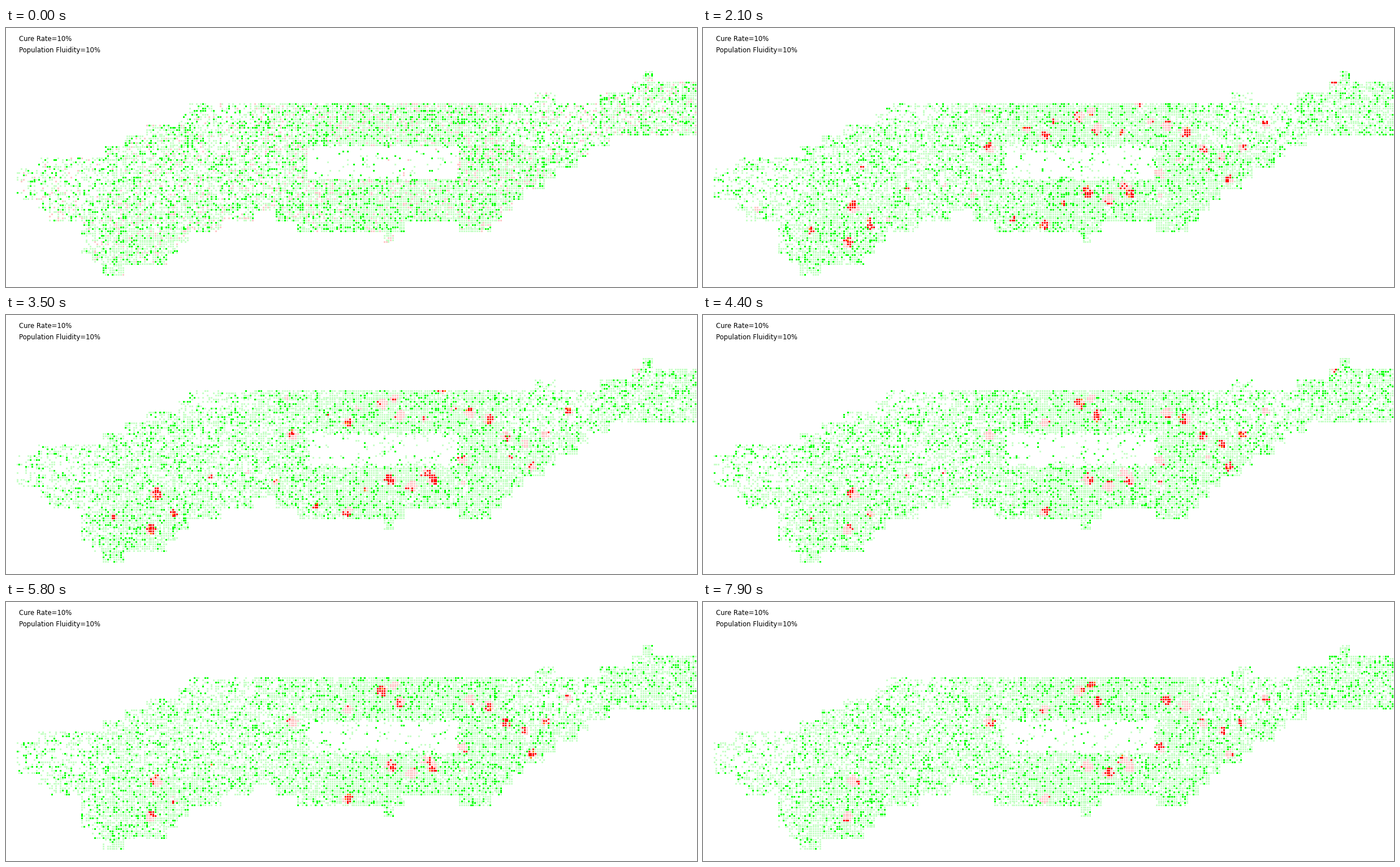
A matplotlib script for the animation above (8 s loop, 1222x458 px).

```python
import numpy as np
import matplotlib.pyplot as plt
from matplotlib.animation import FuncAnimation

W, H = 1222, 458
COLS, ROWS, BLOCK = 320, 120, 5
FRAMES, STEP = 80, 100

WHITE, PALE, GREEN, PINK, RED, ORANGE = range(6)
PALETTE = np.array([(255, 255, 255), (200, 255, 200), (0, 255, 0),
                    (255, 200, 200), (255, 0, 0), (255, 128, 0)], np.uint8)

# Corners of the upper and lower coast in blocks; edges snap down to whole rows
UPPER = [(1, 13.6), (3, 12.9), (9, 11.9), (15, 9), (17, 7), (48, 7), (49, 6),
         (50, 6), (51, 7), (54, 7), (55, 6), (57, 6), (59, 4), (60, 5), (63, 5)]
LOWER = [(1, 16), (4, 18), (6, 18), (7, 21), (9, 23), (10, 23), (11, 22.9),
         (14, 22.9), (17, 19.9), (23, 17.9), (24, 17.9), (27, 19), (34, 19),
         (35, 20), (37, 18), (41, 18), (42, 19), (44, 19), (45, 18), (55, 11),
         (56, 10), (63, 10)]

# Share of used cells from west to east
SETTLED = [(1, .34), (8, .42), (10, .66), (20, .58), (27, .74), (32, .93),
           (45, .86), (55, .70), (63, .76)]

# Centres of the outbreaks that never die out
CENTRES = [(604, 190), (686, 146), (697, 178), (665, 157), (820, 173),
           (851, 183), (884, 214), (953, 212), (918, 228), (930, 268),
           (808, 258), (742, 280), (753, 290), (717, 303), (680, 291),
           (604, 348), (266, 317), (255, 380), (508, 211), (995, 169)]

rng = np.random.default_rng(11)
cell_x = np.floor(np.arange(COLS) * W / COLS).astype(int)
cell_y = np.floor(np.arange(ROWS) * H / ROWS).astype(int)
grid_x, grid_y = np.meshgrid(cell_x + 1.5, cell_y + 1.5)


def enlarge(blocks):
    return np.kron(blocks, np.ones((BLOCK, BLOCK)))


def box_sum(a):
    p = np.pad(a, 1)
    return sum(p[i:i + ROWS, j:j + COLS] for i in range(3) for j in range(3))


def build_density():
    """Return the land mask and the density before and after people mix."""
    row, col = np.mgrid[:ROWS // BLOCK, :COLS // BLOCK]
    coast = [np.floor(np.interp(col, *zip(*side)) + 1e-6)
             for side in (UPPER, LOWER)]
    land = ((col > 0) & (row >= coast[0]) & (row < coast[1])).astype(float)

    dens = np.interp(col, *zip(*SETTLED))
    dens[(row < 9) & (col < 23)] *= .7
    dens[(row < 11) & (col > 45) & (col < 55)] *= .68
    dens[(row > 15) & (col < 19)] += .16
    dens[(row > 10) & (row < 14) & (col > 27) & (col < 42)] = .09
    dens *= rng.uniform(.9, 1.08, land.shape)

    land, dens = enlarge(land), enlarge(land * dens)
    spread = land * box_sum(dens) / np.maximum(box_sum(land), 1)
    return land > 0, dens, spread


land, start_dens, spread_dens = build_density()


def outbreak(x, y, radius, last):
    """Return an outbreak's cells, wave offsets and last frame."""
    dx, dy = grid_x - x, grid_y - y
    edge = radius * rng.uniform(.85, 1.2, land.shape)
    angle = rng.uniform(0, 2 * np.pi)
    lag = (dx * np.cos(angle) + dy * np.sin(angle)) / 34 + rng.random()
    return land & (np.hypot(dx, dy) < edge), lag, last


def build_outbreaks():
    result = [outbreak(x, y, rng.uniform(7, 10), 2 * FRAMES)
              for x, y in CENTRES]
    ys, xs = np.nonzero(start_dens > .55)
    for i in rng.choice(len(xs), 30, replace=False):
        result.append(outbreak(cell_x[xs[i]], cell_y[ys[i]],
                               rng.uniform(4, 6.5), rng.integers(14, 75)))
    return result


outbreaks = build_outbreaks()
home = rng.random(land.shape)
drift = rng.uniform(-.012, .012, land.shape)


def cell_states(k):
    r = np.random.default_rng(500 + k)
    mix = min(k / 6, 1)
    dens = start_dens * (1 - mix) + spread_dens * mix
    used = land & ((home + drift * k) % 1 < dens)
    state = np.where(used, PALE, WHITE)
    moving = (.30 - .13 * dens) * (1 + .3 * np.exp(-k / 3))
    state[used & (r.random(land.shape) < moving)] = GREEN

    # Scattered early cases fade out while outbreaks take hold
    early = used & (r.random(land.shape) < .11 * np.exp(-k / 3))
    state[early] = PINK
    if k:
        state[early & (r.random(land.shape) < .35)] = RED
    grip = min(k / 7, 1)
    hold = r.random(land.shape)
    for cells, lag, last in outbreaks:
        fade = np.clip((last - k) / 8, 0, 1)
        sick = cells & (home < .95 * grip * fade)
        state[sick] = PINK
        wave = sick & ((k / 13 + lag) % 1 < .45) & (hold < .8)
        state[wave] = RED
        state[wave & (hold < .07)] = ORANGE
    return state


def render(k):
    colours = PALETTE[cell_states(k)]
    image = np.full((H, W, 3), 255, np.uint8)
    for i in range(3):
        for j in range(3):
            image[np.ix_(cell_y + i, cell_x + j)] = colours
    return image


fig = plt.figure(figsize=(W / 100, H / 100), dpi=100, facecolor="white")
ax = fig.add_axes([0, 0, 1, 1])
ax.axis("off")
picture = ax.imshow(render(0), extent=(0, W, H, 0), aspect="auto",
                    interpolation="nearest")
for baseline, label in ((23, "Cure Rate=10%"), (43, "Population Fluidity=10%")):
    ax.text(23, baseline, label, family="DejaVu Sans", size=8.4,
            color="black", va="baseline")


def update(k):
    picture.set_data(render(k))
    return [picture]


anim = FuncAnimation(fig, update, frames=FRAMES, interval=STEP,
                     repeat=True, repeat_delay=0)
plt.show()
```
